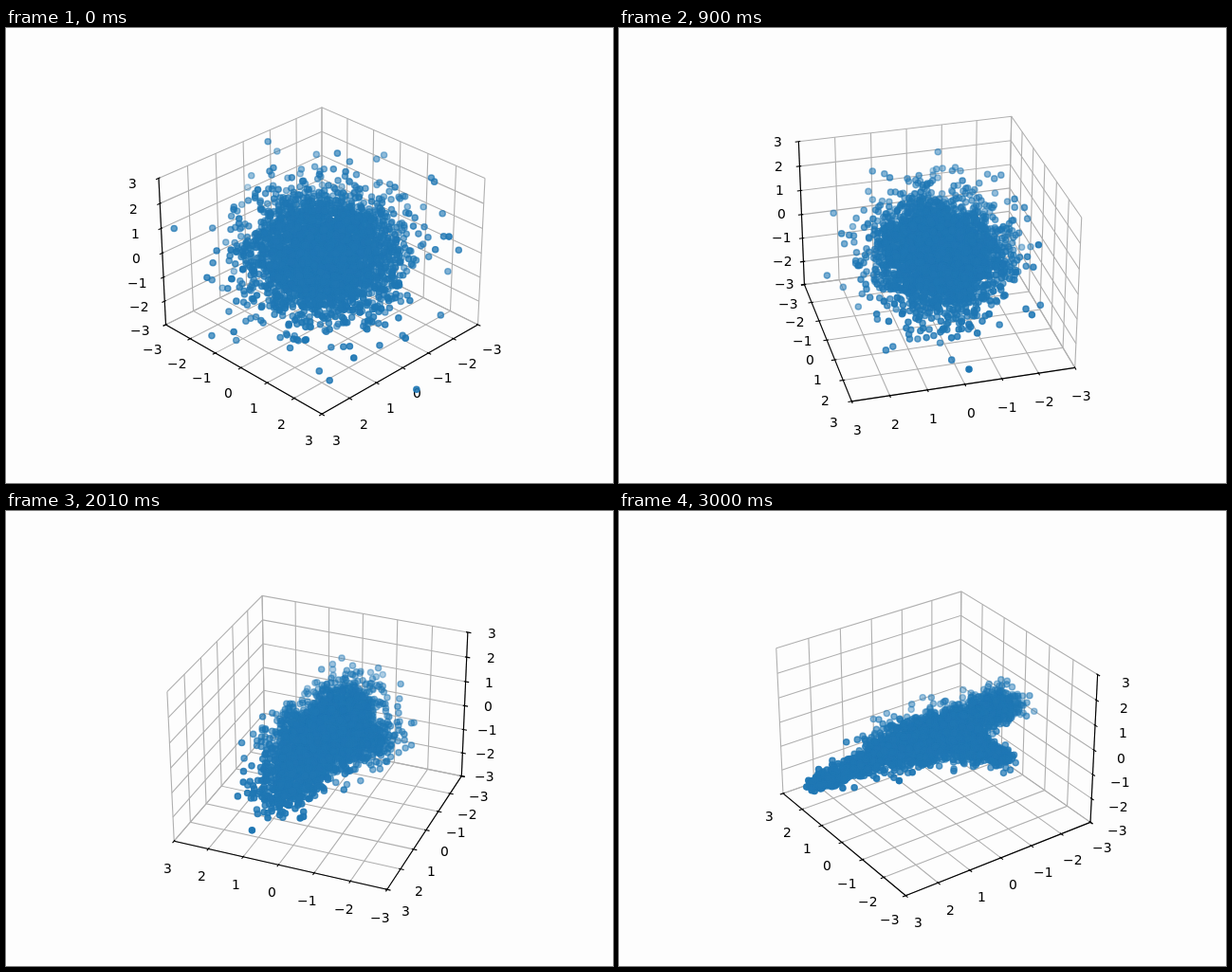
Recreate the animation shown at these times as an HTML page with a canvas. Size 640 by 480 pixels, loop 3030 ms.

```html
<!DOCTYPE html>
<html lang="en">
<head>
<meta charset="utf-8">
<title>Rotating 3D scatter</title>
<style>
  html, body { margin: 0; width: 100%; height: 100%; overflow: hidden; background: #fdfdfd; }
  canvas { display: block; }
</style>
</head>
<body>
<canvas id="stage" width="640" height="480"></canvas>
<script>
const ctx = document.getElementById('stage').getContext('2d');
const STEP = 30, STEPS = 101, COUNT = 3000;
const TICKS = [-3, -2, -1, 0, 1, 2, 3];
const LINE = 0.8 * 100 / 72;
const FONT_SIZE = 13.889;
const font = size => `${size}px "DejaVu Sans", sans-serif`;

// Camera: 30 degrees up, perspective from ten units away
const SCALE = 369.6 / 0.185, CX = 333, CY = 237.4, DIST = 10;
const UNIT_XY = 0.19841, UNIT_Z = 0.14881;
const SIN_E = 0.5, COS_E = Math.sqrt(3) / 2;
let sinA, cosA;

function project([x, y, z]) {
  const side = (y * cosA - x * sinA) * UNIT_XY;
  const front = (x * cosA + y * sinA) * UNIT_XY;
  const h = z * UNIT_Z;
  const depth = DIST - front * COS_E - h * SIN_E;
  const k = SCALE / depth;
  return [CX + side * k, CY - (h * COS_E - front * SIN_E) * k, depth];
}

// Seeded randomness
let seed = 20240;
function rand() {
  seed = (seed + 0x6D2B79F5) | 0;
  let r = Math.imul(seed ^ (seed >>> 15), 1 | seed);
  r = (r + Math.imul(r ^ (r >>> 7), 61 | r)) ^ r;
  return ((r ^ (r >>> 14)) >>> 0) / 4294967296;
}
const gauss = () => Math.sqrt(-2 * Math.log(1 - rand())) * Math.cos(2 * Math.PI * rand());
const gauss3 = () => [gauss(), gauss(), gauss()];

// Final shape: a flat body with three tapering arms
const ARMS = [
  { share: 0.28, tip: [0.1, 3.8, -0.35], power: 1.25, wide: 0.38, thin: 0.1 },
  { share: 0.24, tip: [-0.25, -2.25, 0.62], power: 0.6, wide: 0.35, thin: 0.27 },
  { share: 0.17, tip: [-1.6, -1.2, -0.4], power: 0.8, wide: 0.34, thin: 0.13 }
];

function shapePoint() {
  let pick = rand();
  for (const { share, tip, power, wide, thin } of ARMS) {
    if (pick < share) {
      const u = rand() ** power, spread = wide + (thin - wide) * u;
      return gauss3().map((g, i) => tip[i] * u + g * spread);
    }
    pick -= share;
  }
  const [a, b, c] = gauss3();
  return [0.1 + a * 0.5, 0.15 + b * 0.75, c * 0.25];
}

// Outlying starting points: sideways, towards the viewer, height
const OUTLIERS = [
  [2.43, 3.3, -2.85], [0.2, 3, -2.75], [-3.9, 0, 1], [-1.45, -2, 3.08],
  [2.9, -0.8, 2.45], [2.95, -0.3, 2.65], [3.25, 1.5, 1.8], [-2.9, 1.5, -2.2]
];
const points = Array.from({ length: COUNT }, (_, i) => {
  let start = gauss3();
  if (i < OUTLIERS.length) {
    const [s, f, z] = OUTLIERS[i];
    start = [(f - s) * Math.SQRT1_2, (f + s) * Math.SQRT1_2, z];
  }
  return { start, end: shapePoint() };
});

function polyline(color, ...pts) {
  ctx.strokeStyle = color;
  ctx.lineWidth = LINE;
  ctx.beginPath();
  for (const p of pts) ctx.lineTo(...project(p).slice(0, 2));
  ctx.stroke();
}

// Half the label's advance, less the fraction of its left bearing, so the ink lands on whole pixels
const labels = new Map(TICKS.map(t => {
  const text = String(t).replace('-', '\u2212');
  ctx.font = font(FONT_SIZE * 100);
  const { width, actualBoundingBoxLeft } = ctx.measureText(text);
  return [t, { text, shift: width / 200 - (-actualBoundingBoxLeft / 100) % 1 }];
}));

const withAt = (p, i, v) => p.map((old, k) => k === i ? v : old);

function drawAxes(back) {
  // Gridlines run over the two back panes that each axis touches
  for (let axis = 0; axis < 3; axis++) {
    const [j, k] = [0, 1, 2].filter(i => i !== axis);
    for (const t of TICKS) {
      const corner = withAt(back, axis, t);
      polyline('#b0b0b0', withAt(corner, j, -back[j]), corner, withAt(corner, k, -back[k]));
    }
  }
  ctx.font = font(FONT_SIZE);
  ctx.fillStyle = '#000';
  for (let axis = 0; axis < 3; axis++) {
    const dir = axis === 0 ? 1 : 0;
    const edge = withAt(back, dir, -back[dir]);
    polyline('#000', withAt(edge, axis, -3), withAt(edge, axis, 3));
    for (const t of TICKS) {
      const at = withAt(edge, axis, t), out = Math.sign(edge[dir]);
      polyline('#000', withAt(at, dir, edge[dir] - out * 0.048), withAt(at, dir, edge[dir] + out * 0.096));
      const [x, y] = project(at.map((v, i) => i === axis ? v : v + Math.sign(v) * 0.498));
      const { text, shift } = labels.get(t);
      ctx.fillText(text, Math.round(x - shift), Math.round(y + 11));
    }
  }
}

function drawPoints(t) {
  const noise = 1 - t ** 1.25, shape = t ** 0.6;
  const dots = points
    .map(({ start, end }) => project(start.map((v, i) => v * noise + end[i] * shape)))
    .sort((a, b) => b[2] - a[2]);
  const far = -1 / dots[0][2], near = -1 / dots[COUNT - 1][2];
  ctx.fillStyle = ctx.strokeStyle = '#1f77b4';
  ctx.lineWidth = 100 / 72;
  for (const [x, y, depth] of dots) {
    ctx.globalAlpha = 1 - 0.7 * (-1 / depth - near) / (far - near);
    ctx.beginPath();
    ctx.arc(x, y, 3.106, 0, 2 * Math.PI);
    ctx.fill();
    ctx.stroke();
  }
  ctx.globalAlpha = 1;
}

function draw(step) {
  const azimuth = 45 + step;
  sinA = Math.sin(azimuth * Math.PI / 180);
  cosA = Math.cos(azimuth * Math.PI / 180);
  ctx.fillStyle = '#fdfdfd';
  ctx.fillRect(0, 0, 640, 480);
  drawAxes([azimuth > 90 ? 3 : -3, -3, -3]);
  drawPoints(step / (STEPS - 1));
}

let shown = -1;
function tick() {
  const step = Math.floor(performance.now() / STEP) % STEPS;
  if (step !== shown) draw(shown = step);
  requestAnimationFrame(tick);
}
tick();
</script>
</body>
</html>
```
